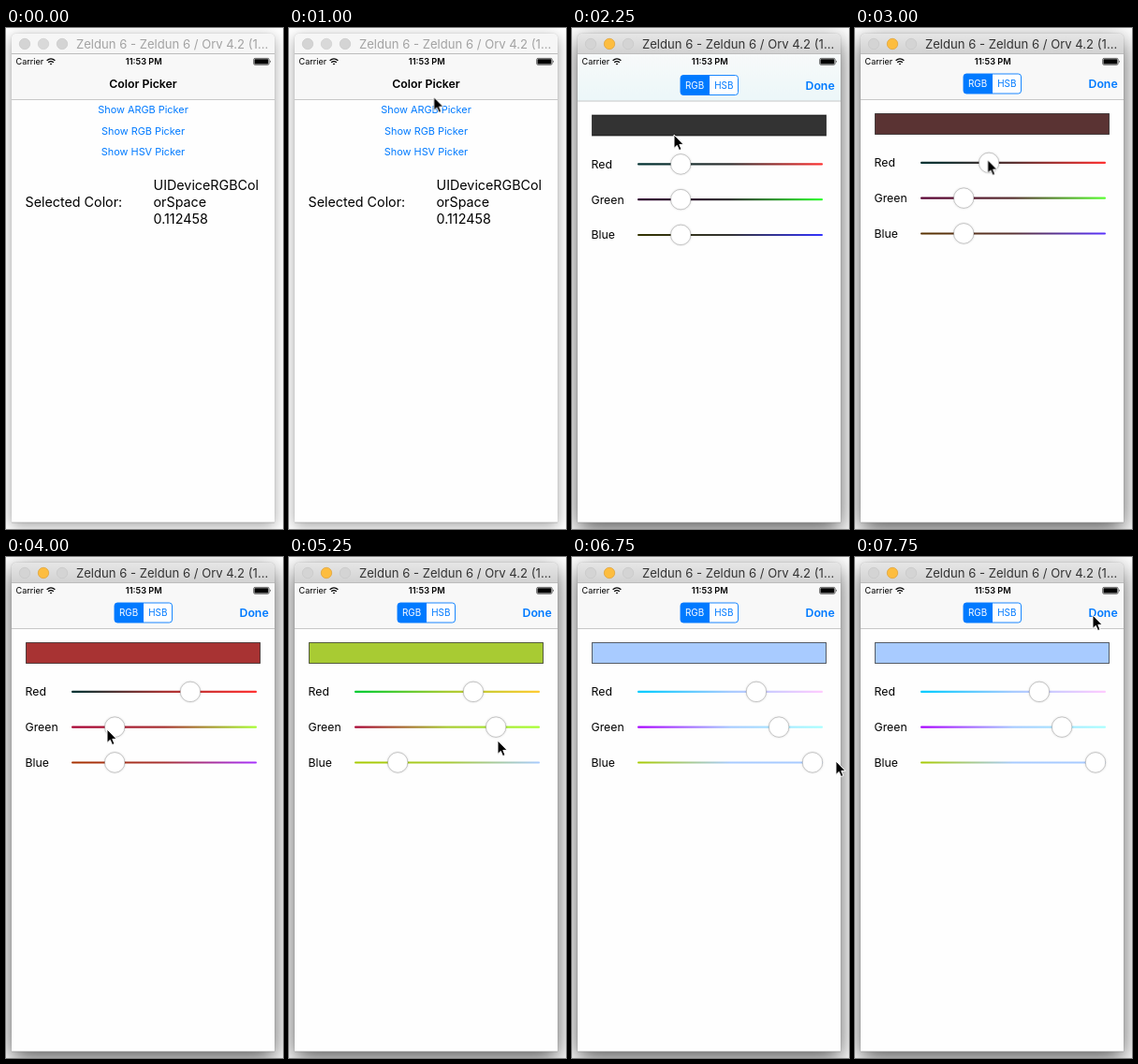
An HTML page for the animation above (8000 ms loop, 296 by 535 pixels).

```html
<!DOCTYPE html>
<html lang="en">
<head>
<meta charset="utf-8">
<title>Color Picker</title>
<style>
  @property --r { syntax: "<number>"; inherits: true; initial-value: 51; }
  @property --g { syntax: "<number>"; inherits: true; initial-value: 51; }
  @property --b { syntax: "<number>"; inherits: true; initial-value: 51; }

  html, body { margin: 0; width: 100%; height: 100%; overflow: hidden; background: #fff; }
  .stage { position: relative; width: 296px; height: 535px; overflow: hidden; }
  .window {
    position: absolute; left: 6px; top: 6px; width: 281px; height: 522px;
    border-radius: 5px 5px 0 0; background: #fefefe;
  }
  svg { position: absolute; inset: 0; font-family: Inter, Roboto, sans-serif; }

  .window, .stage svg, .bar, .title, .mini, .tapped, .sheet, .tint, .cursor {
    animation: 8s step-end -20ms infinite;
  }
  .window { animation-name: shadow; }
  .stage svg { animation-name: color; }
  .bar { animation-name: bar; }
  .title { animation-name: title; font-size: 13.1px; }
  .mini { animation-name: mini; }
  .tapped { animation-name: tap; }
  .sheet { animation-name: sheet; }
  .tint { animation-name: tint; }
  .cursor { animation-name: point; }

  .link { font-size: 10.9px; fill: #007aff; text-anchor: middle; }
  .label { font-size: 14.3px; }
  .row { font-size: 12.3px; }
  .bold { font-weight: 600; font-size: 12.3px; }
  .seg { font-size: 9.9px; text-anchor: middle; }
  .mid { text-anchor: middle; }
  .blue { fill: #007aff; }
  .thumb { fill: #fff; stroke: rgba(0, 0, 0, .24); stroke-width: .8; filter: drop-shadow(0 .6px 1px rgba(0, 0, 0, .22)); }
  .swatch, .now { --c: rgb(var(--r) var(--g) var(--b)); }
  .swatch { fill: var(--c); stroke: #000; stroke-opacity: .6; }
  .now { stop-color: var(--c); }
  .r0 { stop-color: rgb(0 var(--g) var(--b)); }
  .r1 { stop-color: rgb(255 var(--g) var(--b)); }
  .g0 { stop-color: rgb(var(--r) 0 var(--b)); }
  .g1 { stop-color: rgb(var(--r) 255 var(--b)); }
  .b0 { stop-color: rgb(var(--r) var(--g) 0); }
  .b1 { stop-color: rgb(var(--r) var(--g) 255); }
  .red { transform: translateX(calc(var(--r) / 255 * 176px)); }
  .green { transform: translateX(calc(var(--g) / 255 * 176px)); }
  .bluer { transform: translateX(calc(var(--b) / 255 * 176px)); }

  /* window gains focus on the first click */
  @keyframes shadow {
    0% { box-shadow: 0 4px 15px rgba(0, 0, 0, .36), 0 0 1px rgba(0, 0, 0, .35); }
    21.875%, 100% { box-shadow: 0 8px 24px rgba(0, 0, 0, .66), 0 0 1px rgba(0, 0, 0, .5); }
  }
  @keyframes bar {
    0% { fill: #f6f6f6; }
    21.875%, 100% { fill: url(#chrome); }
  }
  @keyframes title {
    0% { fill: #a3a3a3; }
    21.875%, 100% { fill: #333; }
  }
  @keyframes mini {
    0% { fill: #d9d9d9; stroke: #cecece; }
    21.875%, 100% { fill: #fdbd3f; stroke: #dfa033; }
  }
  @keyframes tap {
    0% { opacity: 1; }
    21.875% { opacity: .2; }
    25% { opacity: .7; }
    28.125%, 100% { opacity: 1; }
  }
  @keyframes sheet {
    0% { transform: translateY(510px); }
    25% { transform: translateY(140px); }
    28.125% { transform: translateY(1.5px); }
    31.25%, 100% { transform: none; }
  }
  @keyframes tint {
    0% { opacity: 1; }
    31.25%, 100% { opacity: 0; }
  }
  /* each drag advances every 250 ms */
  @keyframes color {
    0% { --r: 51; --g: 51; --b: 51; }
    34.375% { --r: 51; animation-timing-function: steps(3, end); }
    43.75% { --r: 168; --g: 51; }
    50% { --r: 168; --g: 51; --b: 51; animation-timing-function: steps(4, end); }
    62.5% { --r: 168; --g: 203; --b: 51; }
    68.75% { --r: 168; --g: 203; --b: 51; animation-timing-function: steps(4, end); }
    81.25%, 100% { --r: 168; --g: 203; --b: 255; }
  }
  @keyframes point {
    0% { transform: translate(320px, 12px); }
    6.25% { transform: translate(288px, 13px); animation-timing-function: steps(3, end); }
    15.625% { transform: translate(88px, 104px); }
    18.75% { transform: translate(107px, 114px); }
    21.875% { transform: translate(109px, 114px); }
    28.125% { transform: translate(109px, 114px); animation-timing-function: steps(2, end); }
    34.375% { transform: translate(115px, 140px); animation-timing-function: steps(3, end); }
    43.75% { transform: translate(195px, 142px); animation-timing-function: steps(2, end); }
    50% { transform: translate(108px, 184px); animation-timing-function: steps(4, end); }
    62.5% { transform: translate(212px, 188px); }
    65.625% { transform: translate(223px, 196px); }
    68.75% { transform: translate(113px, 215px); animation-timing-function: steps(4, end); }
    81.25% { transform: translate(256px, 218px); }
    84.375% { transform: translate(282px, 218px); animation-timing-function: steps(4, end); }
    96.875%, 100% { transform: translate(254px, 62px); }
  }
</style>
</head>
<body>
<div class="stage">
  <div class="window"></div>
  <svg width="296" height="535" viewBox="0 0 296 535">
    <defs>
      <linearGradient id="chrome" x2="0" y2="1"><stop stop-color="#e6e6e6"/><stop offset="1" stop-color="#d1d1d1"/></linearGradient>
      <linearGradient id="glow" x2="0" y2="1"><stop stop-color="#f8fafa"/><stop offset="1" stop-color="#ecf7f9"/></linearGradient>
      <linearGradient id="red"><stop class="r0"/><stop offset=".5" class="now"/><stop offset="1" class="r1"/></linearGradient>
      <linearGradient id="green"><stop class="g0"/><stop offset=".5" class="now"/><stop offset="1" class="g1"/></linearGradient>
      <linearGradient id="blue"><stop class="b0"/><stop offset=".5" class="now"/><stop offset="1" class="b1"/></linearGradient>
      <clipPath id="screen"><path d="M6 28h281v500H6z"/></clipPath>
    </defs>

    <!-- title bar -->
    <path class="bar" d="M6 28V11q0-5 5-5h271q5 0 5 5v17z"/>
    <path d="M6 27.5h281" stroke="#bdbdbd"/>
    <g fill="#d4d4d4" stroke="#c8c8c8" stroke-width=".7">
      <circle cx="20" cy="17" r="5.7"/>
      <circle class="mini" cx="40" cy="17" r="5.7"/>
      <circle cx="60" cy="17" r="5.7"/>
    </g>
    <text class="title" x="75" y="22">Zeldun 6 - Zeldun 6 / Orv 4.2 (1...</text>

    <!-- main screen -->
    <path d="M6 28h281v48.5H6z" fill="#f8f8f8"/>
    <path d="M6 76.5h281" stroke="#bcbcbc" stroke-width=".8"/>
    <text class="bold mid" x="146.5" y="64">Color Picker</text>
    <text class="link" x="146.5" y="91">Show ARGB Picker</text>
    <text class="link tapped" x="146.5" y="113.7">Show RGB Picker</text>
    <text class="link" x="146.5" y="136">Show HSV Picker</text>
    <g class="label">
      <text x="20.5" y="190.7">Selected Color:</text>
      <text x="157.5" y="173">UIDeviceRGBCol</text>
      <text x="157.5" y="191">orSpace</text>
      <text x="157.5" y="208.7">0.112458</text>
    </g>

    <!-- picker sheet -->
    <g clip-path="url(#screen)">
      <g class="sheet">
        <path d="M6 26h281v503H6z" fill="#fefefe"/>
        <path d="M6 26h281v50.5H6z" fill="#f8f8f8"/>
        <path class="tint" d="M6 26h281v50.5H6z" fill="url(#glow)"/>
        <path d="M6 76.5h281" stroke="#bcbcbc" stroke-width=".8"/>
        <rect x="116" y="49" width="61.5" height="21" rx="3" fill="#fdfeff" stroke="#007aff" stroke-width=".9"/>
        <path class="blue" d="M147 49h-28q-3 0-3 3v15q0 3 3 3h28z"/>
        <text class="seg" x="131" y="63.2" fill="#fff">RGB</text>
        <text class="seg blue" x="162.3" y="63.2">HSB</text>
        <text class="bold blue" x="249.5" y="64">Done</text>

        <rect class="swatch" x="21.5" y="91.5" width="250" height="22"/>
        <g class="row">
          <text x="20.5" y="148">Red</text>
          <text x="20.5" y="186">Green</text>
          <text x="20.5" y="223.5">Blue</text>
        </g>
        <rect x="70" y="142.8" width="198" height="2.2" rx="1" fill="url(#red)"/>
        <rect x="70" y="180.6" width="198" height="2.2" rx="1" fill="url(#green)"/>
        <rect x="70" y="218.4" width="198" height="2.2" rx="1" fill="url(#blue)"/>
        <g class="red"><circle class="thumb" cx="81" cy="143.9" r="10.7"/></g>
        <g class="green"><circle class="thumb" cx="81" cy="181.6" r="10.7"/></g>
        <g class="bluer"><circle class="thumb" cx="81" cy="219.4" r="10.7"/></g>
      </g>
    </g>

    <!-- status bar -->
    <text x="10.5" y="39" font-size="9.1">Carrier</text>
    <text class="mid" x="147.3" y="39" font-size="9.2" font-weight="600">11:53 PM</text>
    <g fill="none" stroke="#000" stroke-width="1.3">
      <path d="M43.6 34.8q4.4-3.8 8.8 0M45.2 36.8q2.8-2.3 5.6 0"/>
      <path d="M48 39.6l-1.3-1.5q1.3-.9 2.6 0z" fill="#000" stroke="none"/>
    </g>
    <rect x="264.7" y="32.4" width="16.4" height="6.9" rx="1.4" fill="none" stroke="#000" stroke-width=".6"/>
    <rect x="265.5" y="33.2" width="14.8" height="5.3" rx=".7"/>
    <path d="M282 34.6q1.4 1.3 0 2.6z"/>

    <path d="M6 528h281" stroke="#a8a8a8" stroke-width=".6"/>
    <g class="cursor">
      <path d="M0 0V14.4L3.3 11.4 5.5 16.6 8 15.5 5.8 10.4H10.2z" stroke="#fff" stroke-width="1" stroke-linejoin="round"/>
    </g>
  </svg>
</div>
</body>
</html>
```
